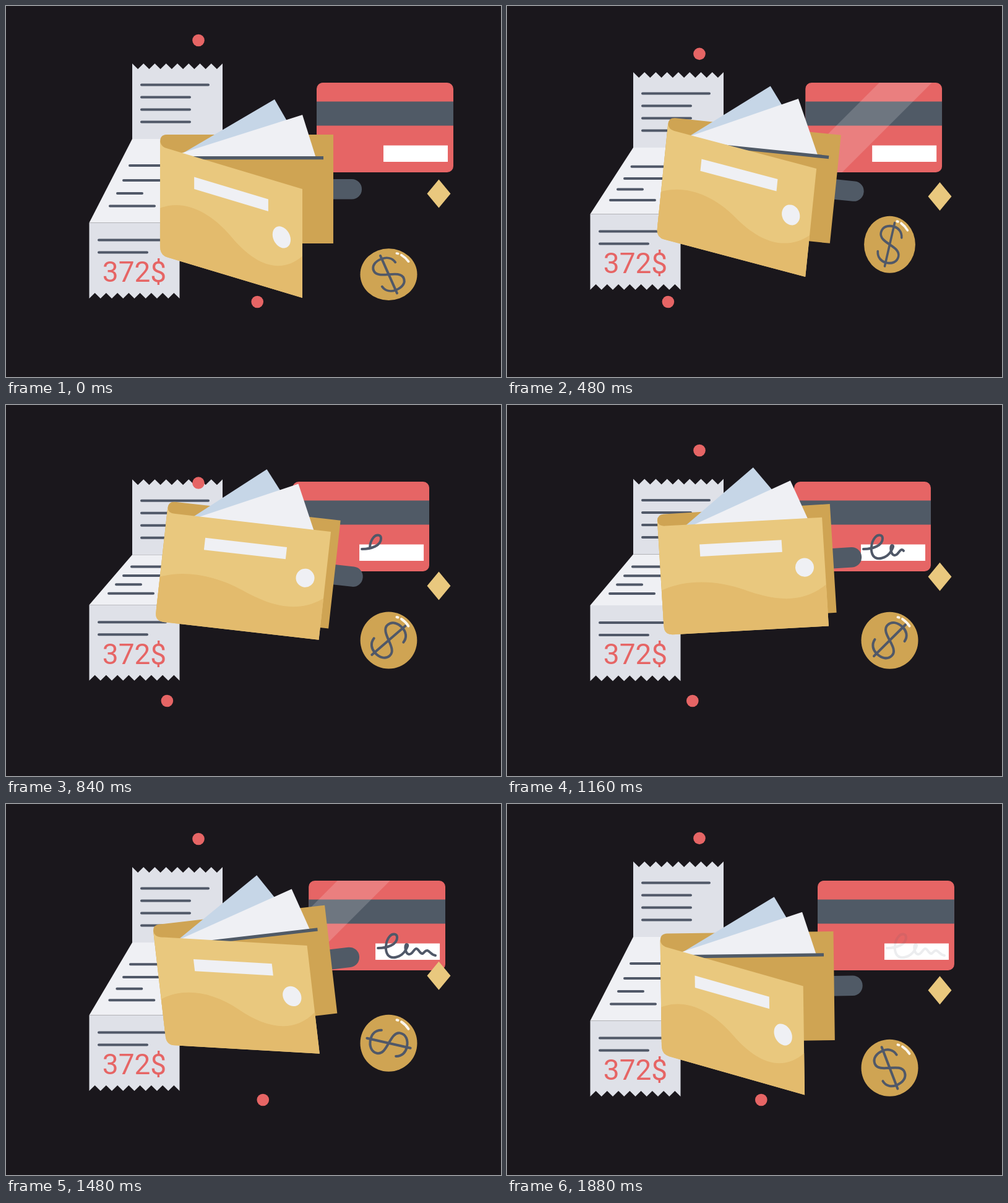
Recreate the animation shown at these times as an HTML page. Size 800 by 600 pixels, loop 1920 ms.

```html
<!DOCTYPE html>
<html lang="en">
<head>
<meta charset="utf-8">
<title>Wallet</title>
<style>
  html, body { margin: 0; width: 100%; height: 100%; overflow: hidden; background: #1a171c; }
  svg { display: block; }
  .line { fill: none; stroke: #505868; stroke-width: 4; stroke-linecap: round; stroke-linejoin: round; }
  .paper { fill: #dfe1e8; }
  .light { fill: #eff0f4; }
  .red { fill: #e66565; }
  .gold { fill: #cfa453; }
  .sand { fill: #e9c87e; }
  .slate { fill: #505a66; }
  text { font: 46px Roboto, Arial, sans-serif; text-anchor: middle; }
</style>
</head>
<body>
<svg width="800" height="600" viewBox="0 0 800 600">
  <clipPath id="cardClip"><rect width="221" height="145" rx="10"/></clipPath>
  <clipPath id="slotClip"><rect x="200" y="0" width="400" height="245"/></clipPath>

  <path id="fold" class="light"/>
  <path id="foldLines" class="line"/>
  <g id="receiptTop">
    <path id="topPaper" class="paper"/>
    <path class="line" d="M219 127.5H327M219 147.5H297M219 167.5H297M219 187.5H297"/>
  </g>
  <g id="receiptEnd">
    <path id="endPaper" class="paper"/>
    <path class="line" d="M150 378.5H258M150 398.5H228"/>
    <text class="red" x="207.5" y="446">372$</text>
  </g>

  <g id="card">
    <g clip-path="url(#cardClip)">
      <rect class="red" width="221" height="145"/>
      <rect class="slate" y="30.5" width="221" height="39"/>
      <path id="shine" fill="#fff" opacity=".17" d="M0 0H-85L-230 145H-145Z"/>
    </g>
    <rect x="108" y="101.5" width="104" height="26.5" fill="#fff"/>
    <path id="sign" class="line" pathLength="1" d="M112 109C128 109 143 103 143 92C143 85 135 85 131 90C124 98 123 113 128 120C134 128 150 124 157 112C161 105 161 103 158 103C155 105 156 118 162 119C168 120 170 110 174 110C178 110 179 118 184 118C187 117 188 112 192 113C196 114 198 120 205 121"/>
  </g>

  <g id="wallet">
    <rect class="slate" x="500" y="280" width="75" height="32.5" rx="16"/>
    <path class="gold" d="M529 208H260Q249 208 249 219V384H529Z"/>
    <g clip-path="url(#slotClip)">
      <path id="blueNote" fill="#c6d6e7" d="M434 151L279 242L350 290H514Z"/>
      <path id="whiteNote" class="light" d="M479 176L274 241L300 290H515Z"/>
    </g>
    <rect class="slate" x="275" y="243" width="238" height="5.3"/>
    <g id="front">
      <path class="sand" d="M0 -9Q1 0 12 0H267V176H14Q0 176 0 162Z"/>
      <path id="wave" fill="#e3bb6d"/>
      <rect id="label" class="light" y="33" height="19.5"/>
      <circle id="button" class="light"/>
    </g>
  </g>

  <g id="coin">
    <circle class="gold" r="46"/>
    <g id="dollar">
      <path class="line" d="M18 -16C16 -26 8 -30 0 -30C-12 -30 -20 -24 -20 -15C-20 -6 -10 -3 0 0C10 3 20 6 20 15C20 24 12 30 0 30C-8 30 -16 26 -18 16M0 -36V36"/>
    </g>
    <path d="M13 -37.5L15 -37M20.5 -34.5A40 40 0 0 1 32 -23" fill="none" stroke="#fbf6ec" stroke-width="4" stroke-linecap="round"/>
  </g>
  <path id="diamond" class="sand" d="M0 -23L19 0L0 23L-19 0Z"/>
  <circle id="bouncer" class="red" cx="311" r="9.8"/>
  <circle id="slider" class="red" cy="478.5" r="9.8"/>
</svg>
<script>
const LOOP = 1920, HALF = LOOP / 2;
const el = id => document.getElementById(id);
const set = (id, attrs) => { for (const k in attrs) el(id).setAttribute(k, attrs[k]); };
const move = (id, transform) => set(id, { transform });
const clamp = v => Math.min(1, Math.max(0, v));
const mix = (a, b, k) => a + (b - a) * k;
const mod = t => ((t % LOOP) + LOOP) % LOOP;
const smooth = u => u * u * (3 - 2 * u);

// cubic-bezier(a, 0, b, 1), solved by bisection
function ease(u, a = .78, b = 1 - a) {
  let lo = 0, hi = 1, s = .5;
  for (let i = 0; i < 22; i++) {
    s = (lo + hi) / 2;
    const x = 3 * s * (1 - s) ** 2 * a + 3 * s * s * (1 - s) * b + s ** 3;
    if (x < u) lo = s; else hi = s;
  }
  return smooth(s);
}

// 0 to 1 and back again, highest at half the loop
const swing = t => ease(1 - Math.abs(1 - mod(t) / HALF));

// 1 at impact, 0 at the top of the flight
function bounce(t, up, down) {
  const u = 1 - mod(t) / HALF;
  return Math.abs(u) ** (u > 0 ? up : down);
}

// smooth steps between [time, value] pairs
function track(t, ...keys) {
  const i = keys.findIndex(k => k[0] > t);
  if (i < 0) return keys[keys.length - 1][1];
  if (!i) return keys[0][1];
  const [t0, v0] = keys[i - 1], [t1, v1] = keys[i];
  return mix(v0, v1, smooth((t - t0) / (t1 - t0)));
}

function tilt(t) {
  if (t < 760) return 7 * Math.sin(Math.PI / 2 * t / 760);
  if (t < 1360) return 7 * Math.cos(Math.PI * (t - 760) / 600);
  return -7 * Math.cos(Math.PI / 2 * (t - 1360) / 560);
}

function zigzag(x, edge, dir, base) {
  let d = `M${x} ${base}V${edge}`;
  for (let i = 1; i <= 16; i++) d += `L${x + i * 9.125} ${edge + (i % 2) * 9 * dir}`;
  return d + `V${base}Z`;
}
set('topPaper', { d: zigzag(204, 93, 1, 215) });
set('endPaper', { d: zigzag(134.5, 473, -1, 350.5) });

function drawReceipt(p) {
  const d = 27.5 * p;
  move('receiptTop', `translate(0 ${d})`);
  move('receiptEnd', `translate(0 ${-d})`);
  set('fold', { d: `M204 ${215 + d}H350L280.5 ${350.5 - d}H134.5Z` });
  const row = (x0, x1, y0, y1, len) => `M${mix(x0, x1, p)} ${mix(y0, y1, p)}h${len}`;
  set('foldLines', {
    d: row(200, 203, 258, 261.5, 80) + row(190, 190, 282, 276, 85) +
       row(180, 178, 303, 290, 40) + row(168, 166, 323.5, 304.5, 72)
  });
}

function drawCard(t, p) {
  move('card', `translate(${502 - 39.3 * p} 124)`);
  move('shine', `translate(${400 * p + 160 * p ** 6} 0)`);
  const drawn = clamp((t - 605) / 670);
  set('sign', {
    'stroke-dasharray': `${drawn} 2`,
    opacity: drawn && clamp((1905 - t) / 225)
  });
}

function drawWallet(t) {
  const lift = 40 * (t < HALF ? smooth(clamp((t - 160) / 800))
                              : 1 - smooth(clamp((t - HALF) / 940) ** 1.8));
  move('wallet', `translate(0 ${-lift}) rotate(${tilt(t)} 389 321)`);
  const white = track(t, [0, 0], [440, 1], [800, 1], [1500, 0]);
  const blue = track(t, [0, 0], [660, 1], [880, 1], [1790, 0]);
  move('whiteNote', `rotate(${-7.3 * white} 315 359)`);
  move('blueNote', `rotate(${-8.8 * blue} 340 357)`);

  const p = swing(t - 15);
  move('front', `matrix(${mix(230, 267, p) / 267} ${69 * (1 - p) / 267} 0 1 249 227)`);
  set('wave', {
    d: `M0 ${100 + 4 * p}C40 ${76 + 12 * p} 90 ${78 + 14 * p} 134 ${112 - 2 * p}` +
       `S225 ${150 - 10 * p} 267 108.5V176H14Q0 176 0 162Z`
  });
  set('label', { x: 64 + 2 * p, width: 139 - 6 * p });
  set('button', { cx: 228 + 6 * p, cy: 88 - 9 * p, r: 17 - 2 * p });
}

function drawCoin(t, p) {
  const y = 380.5 + 61.5 * bounce(t - 40, 4, 3.3);
  const sx = track(t, [160, 1], [400, .9], [520, .9], [880, 1]);
  const sy = track(t, [0, .91], [40, .86], [400, 1], [1880, 1], [1920, .91]);
  move('coin', `translate(618.5 ${y}) scale(${sx} ${sy})`);
  const turn = t < HALF ? -22 + 72 * p : 50 - 252 * (1 - swing(t - 40));
  move('dollar', `rotate(${turn})`);
}

function drawBits(t) {
  move('diamond', `translate(699.5 ${277.2 + 31 * swing(t + 600)})`);
  set('bouncer', { cy: 55.3 + 78 * bounce(t - 880, 4.2, 2.35) });
  const s = mod(t - 640);
  const x = s < 1000 ? ease(s / 1000, .9, .37) : 1 - ease((s - 1000) / 920);
  set('slider', { cx: 257 + 163 * x });
}

function frame(now) {
  const t = mod(now - start), p = swing(t);
  drawReceipt(p);
  drawCard(t, p);
  drawWallet(t);
  drawCoin(t, p);
  drawBits(t);
  requestAnimationFrame(frame);
}
const start = performance.now();
frame(start);
</script>
</body>
</html>
```
